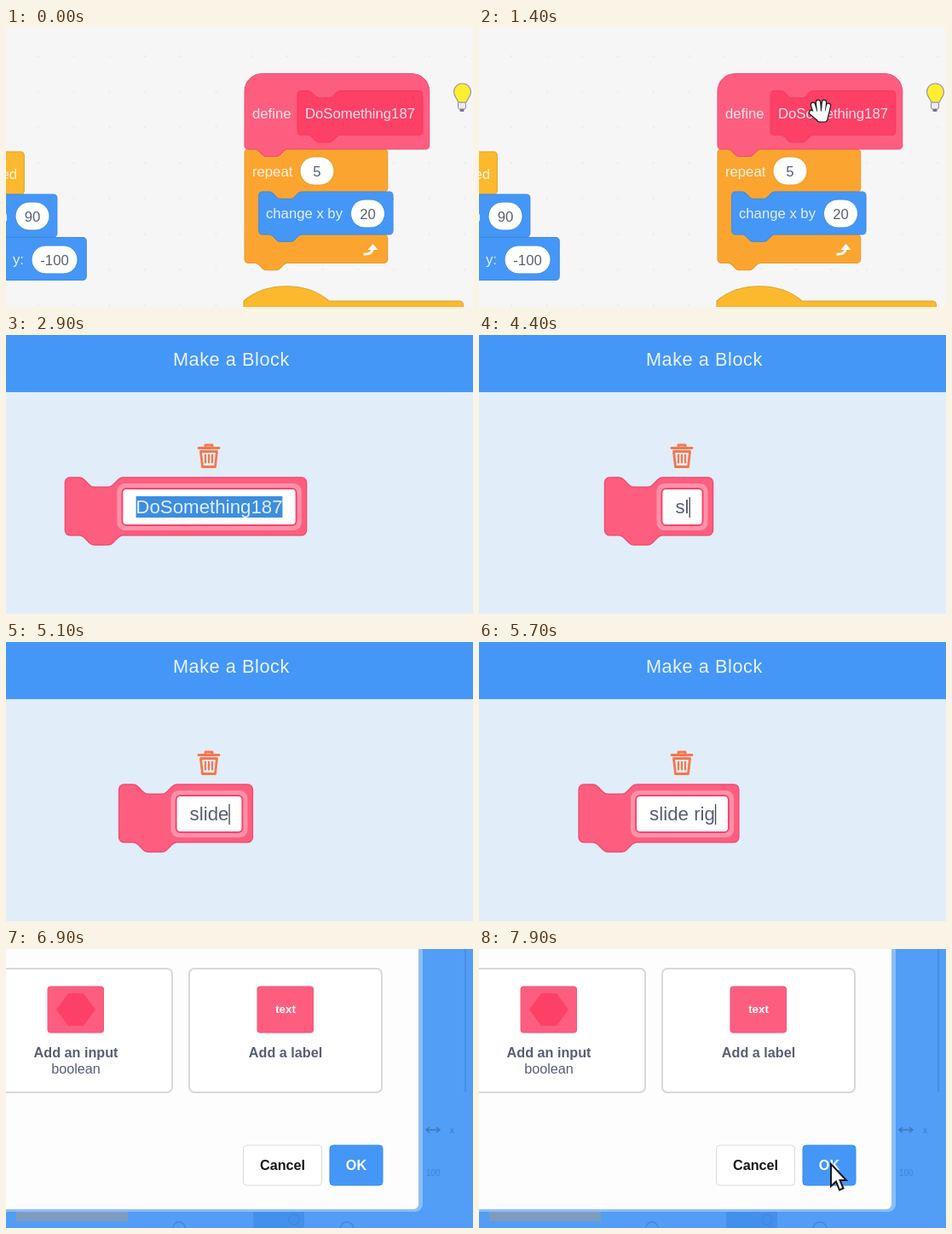
An HTML page with a canvas for the animation above (8000 ms loop, 548 by 327 pixels).

```html
<!DOCTYPE html>
<html lang="en">
<head>
<meta charset="utf-8">
<title>Renaming a custom block</title>
<style>
  html, body { margin: 0; width: 100%; height: 100%; overflow: hidden; background: #f6f6f7; }
  canvas { display: block; }
</style>
</head>
<body>
<canvas id="stage" width="548" height="327"></canvas>
<script>
const ctx = document.getElementById('stage').getContext('2d');
const LOOP = 8000, SCALE = 1.042;
const FONT = '"Liberation Sans", Arial, sans-serif';
const PINK = '#fd5e7f', PINK_DARK = '#fd4066', PINK_LINE = '#f04c72';
const BLUE = '#4597f7', BLUE_LINE = '#4089e0';
const ORANGE = '#fba530', ORANGE_LINE = '#e69a2c';
const YELLOW = '#fcb92e', YELLOW_LINE = '#dba62a';
const INK = '#575e75';

// Times of the cuts and key presses
const MENU_OPENS = 1750, DIALOG_OPENS = 2400, DIALOG_BOTTOM = 6900;
const NEW_NAME = 'slide right';
const KEY_TIMES = [4200, 4400, 4600, 4800, 5000, 5200, 5350, 5500, 5650, 5800, 5900];

// Block outlines, in block units
const NOTCH = 'c2 0 3 1 4 2l4 4c1 1 2 2 4 2h12c2 0 3-1 4-2l4-4c1-1 2-2 4-2';
const TAB = 'c-2 0-3 1-4 2l-4 4c-1 1-2 2-4 2h-12c-2 0-3-1-4-2l-4-4c-1-1-2-2-4-2';
const corner = (dx, dy, r = 4) => `a${r} ${r} 0 0 1 ${dx * r} ${dy * r}`;
const rightAndBottom = (w, h) => `V${h - 4}${corner(-1, 1)}H48${TAB}H4${corner(-1, -1)}z`;
const stackPath = (w, h = 48) =>
  `M0 4${corner(1, -1)}h8${NOTCH}H${w - 4}${corner(1, 1)}` + rightAndBottom(w, h);
const definePath = (w, h) =>
  `M0 20${corner(1, -1, 20)}H${w - 20}${corner(1, 1, 20)}` + rightAndBottom(w, h);
const hatPath = w => `M0 0c25-22 71-22 96 0H${w - 4}${corner(1, 1)}` + rightAndBottom(w, 48);
const loopPath = w =>
  `M0 4${corner(1, -1)}h8${NOTCH}H${w - 4}${corner(1, 1)}v40${corner(-1, 1)}H64${TAB}h-8` +
  `a4 4 0 0 0-4 4v40a4 4 0 0 0 4 4h8${NOTCH}H${w - 4}${corner(1, 1)}` + rightAndBottom(w, 128);

const ARROW = 'M0 0V26L6 20.5L10 30.5L14.5 28.5L10.5 19H18Z';

const clamp = v => Math.max(0, Math.min(1, v));
const ease = v => v * v * (3 - 2 * v);
const mix = (a, b, v) => a + (b - a) * v;

function glide(t, start, end, from, to) {
  const v = ease(clamp((t - start) / (end - start)));
  return [mix(from[0], to[0], v), mix(from[1], to[1], v)];
}

function rect(x, y, w, h, fill, r = 0, line, lineWidth = 1) {
  ctx.beginPath();
  ctx.roundRect(x, y, w, h, r);
  paint(fill, line, lineWidth);
}

function circle(x, y, r, fill, line, lineWidth) {
  ctx.beginPath();
  ctx.arc(x, y, r, 0, Math.PI * 2);
  paint(fill, line, lineWidth);
}

function paint(fill, line, lineWidth = 1, path) {
  const shape = path ? [path] : [];
  if (fill) { ctx.fillStyle = fill; ctx.fill(...shape); }
  if (line) { ctx.strokeStyle = line; ctx.lineWidth = lineWidth; ctx.stroke(...shape); }
}

function draw(path, x, y, fill, line, lineWidth = 1, scale = 1) {
  ctx.save();
  ctx.translate(x, y);
  ctx.scale(scale, scale);
  paint(fill, line, lineWidth, new Path2D(path));
  ctx.restore();
}

const block = (path, x, y, fill, line) => draw(path, x, y, fill, line, 1, SCALE);

function text(string, x, y, size, color, align = 'left', weight = 400) {
  ctx.font = `${weight} ${size}px ${FONT}`;
  ctx.textAlign = align;
  ctx.fillStyle = color;
  ctx.fillText(string, x, y);
}

const label = (string, x, y, align) => text(string, x, y, 16.7, 'rgba(255,255,255,.85)', align);

function pill(value, x, y, w, line) {
  rect(x - w / 2, y - 16.5, w, 33, '#fff', 16.5, line);
  text(value, x, y + 6, 16.7, INK, 'center');
}

function arrow(x, y) {
  draw(ARROW, x, y, '#fff', '#161616', 2);
}

function hand(x, y) {
  const fingers = 'M-6 3L-9-7M-2 0L-3-10M3 0L4-10M7 3L9-6M-4 8L-11 2';
  const palm = 'M-3 4H5L4 9H-1Z';
  ctx.save();
  ctx.lineCap = ctx.lineJoin = 'round';
  for (const [color, grow] of [['#222', 2.6], ['#fff', 0]]) {
    draw(fingers, x, y, null, color, 4 + grow);
    draw(palm, x, y, color, color, 7 + grow);
  }
  ctx.restore();
}

function bulb() {
  rect(530.5, 87, 9, 8, '#eeecf2', 2, '#8d87a8');
  rect(532.5, 95, 5, 3, '#77718c', 1);
  draw('M-5 11C-5 7-10 5-10-1A10 10 0 0 1 10-1C10 5 5 7 5 11Z', 535.5, 76, '#fdee32', '#a094a8', 1.2);
}

function workspace() {
  rect(0, 0, 548, 327, '#f6f6f7');
  for (let x = -4.7; x < 548; x += 41.7)
    for (let y = 32; y < 327; y += 41.7) rect(x, y, 2, 2, '#ebebee');

  block(stackPath(174), -160, 145, YELLOW, YELLOW_LINE);
  block(stackPath(211), -160, 195, BLUE, BLUE_LINE);
  block(stackPath(244), -160, 245.5, BLUE, BLUE_LINE);
  label('clicked', 13, 176.5, 'right');
  label('in direction', 2, 226, 'right');
  label('y:', 8, 277);
  pill('90', 31, 220.5, 40, BLUE_LINE);
  pill('-100', 57, 271.5, 54, BLUE_LINE);

  block(hatPath(247), 279, 320, YELLOW, YELLOW_LINE);
  block(loopPath(161), 280, 142, ORANGE, ORANGE_LINE);
  block(definePath(208, 85), 280, 53.5, PINK, PINK_LINE);
  block(stackPath(141, 50), 342, 73.5, PINK_DARK, '#f93a62');
  block(stackPath(151), 296.7, 192, BLUE, BLUE_LINE);
  label('define', 289, 105.5);
  label('DoSomething187', 351, 105.5);
  label('repeat', 289, 173.5);
  label('change x by', 305, 223);
  pill('5', 365, 167.5, 40, ORANGE_LINE);
  pill('20', 424.5, 217.5, 40, BLUE_LINE);
  draw('M0 12Q10 13 11 5', 419.5, 253, null, '#fff', 2.8);
  draw('M5 6H17L11-1Z', 419.5, 254, '#fff');
  bulb();
}

function menu(pointerY) {
  ctx.save();
  ctx.shadowColor = 'rgba(0,0,0,.3)';
  ctx.shadowBlur = 5;
  rect(394, 87, 180, 121, '#fcfcfc', 3, '#83838a');
  ctx.restore();
  const row = Math.floor((pointerY - 94) / 37);
  if (row >= 0) rect(394.5, 94 + row * 37, 160, 36.5, '#d5e8f2');
  ['Add Comment', 'Delete Block', 'Edit'].forEach((item, i) =>
    text(item, 438, 119 + i * 37.3, 21.5, '#222'));
}

function workspaceScene(t) {
  workspace();
  if (t < MENU_OPENS) {
    if (t > 450) hand(...glide(t, 450, 1100, [470, 350], [401, 97]));
    return;
  }
  const tip = t < 2150
    ? glide(t, MENU_OPENS, 2080, [396, 88], [430, 152])
    : glide(t, 2150, 2300, [430, 152], [434, 182]);
  menu(tip[1]);
  arrow(...tip);
}

function trashCan(x, y) {
  ctx.save();
  ctx.lineCap = ctx.lineJoin = 'round';
  const color = '#f6774c';
  draw('M-12 5H12M-4 4V1.5H4V4M-9.5 9L-7.5 27H7.5L9.5 9Z', x, y, null, color, 2.8);
  draw('M-4 13V22M0 13V22M4 13V22', x, y, null, color, 2.2);
  ctx.restore();
}

function nameScene(t) {
  rect(0, 0, 548, 327, '#e1edf8');
  rect(0, 0, 548, 67, BLUE);
  ctx.letterSpacing = '.55px';
  text('Make a Block', 196, 36, 21.7, '#eaf3fe');
  ctx.letterSpacing = '0px';
  trashCan(238, 127.5);

  const typed = KEY_TIMES.filter(k => k <= t).length;
  const name = typed ? NEW_NAME.slice(0, typed) : 'DoSomething187';
  ctx.font = `22.3px ${FONT}`;
  const nameWidth = ctx.measureText(name).width;
  const fieldWidth = nameWidth + 32, fieldX = 238.5 - fieldWidth / 2, nameX = fieldX + 16;

  const scale = 1.41;
  draw(stackPath((fieldWidth + 79) / scale), fieldX - 67, 167, PINK, PINK_LINE, 1, scale);
  rect(fieldX - 6, 174, fieldWidth + 12, 55, '#ff91a8', 9);
  rect(fieldX, 180, fieldWidth, 43, '#fff', 5, '#f9446a', 2);
  text(name, nameX, 209, 22.3, INK);

  if (!typed) {
    const selected = nameWidth * clamp((t - 2450) / 430);
    ctx.save();
    ctx.beginPath();
    ctx.rect(nameX, 189, selected, 25);
    ctx.clip();
    rect(nameX, 189, selected, 25, '#3c8edf');
    text(name, nameX, 209, 22.3, '#e3eefa');
    ctx.restore();
  } else if ((t - KEY_TIMES[typed - 1]) % 1000 < 200) {
    rect(nameX + nameWidth, 190, 1.3, 24, '#444');
  }
}

function confirmScene(t) {
  rect(0, 0, 548, 327, '#529df6');
  // Dimmed editor behind the dialog
  rect(12, 306, 131, 13, '#7e9bbd');
  rect(290, 306, 60, 21, '#4290ee', 3);
  for (const [x, y, r] of [[203, 327, 7], [338, 317, 6], [400, 328, 8]])
    circle(x, y, r, null, '#4387d8', 1.3);
  rect(538.5, 0, 1, 168, '#3f82d2');
  draw('M0 0H16M4-3L0 0L4 3M12-3L16 0L12 3', 493, 212, null, '#3f78bd', 1.5);
  text('x', 521, 216, 10, '#3f78bd');
  text('100', 493, 266, 10, '#3f86da');

  rect(-20, -20, 509, 328, '#8dbef9', 9);
  rect(-20, -20, 504, 325, '#fdfdfd', 6);
  rect(-31, 23, 226, 145, '#fff', 6, '#d5d8dc', 2);
  rect(215, 23, 226, 145, '#fff', 6, '#d5d8dc', 2);

  rect(49, 44, 65.5, 54, PINK, 3, '#f4557a');
  draw('M-23 0L-9-19H9L23 0L9 19H-9Z', 82, 71, PINK_DARK);
  text('Add an input', 82, 127, 16.2, INK, 'center', 700);
  text('boolean', 82, 146, 16.2, INK, 'center');
  rect(295, 44, 65.5, 54, PINK, 3, '#f4557a');
  text('text', 328, 75, 13.3, '#fff', 'center', 700);
  text('Add a label', 328, 127, 16.2, INK, 'center', 700);

  rect(278.5, 230, 92, 47, '#fff', 4, '#dadada');
  text('Cancel', 324.5, 259, 16.2, '#161616', 'center', 700);
  rect(380, 230, 62, 47, BLUE, 4, '#3c8bea');
  text('OK', 411, 259, 16.2, '#fff', 'center', 700);
  arrow(...glide(t, 7250, 7800, [460, 335], [413, 252]));
}

function frame() {
  const t = performance.now() % LOOP;
  if (t < DIALOG_OPENS) workspaceScene(t);
  else if (t < DIALOG_BOTTOM) nameScene(t);
  else confirmScene(t);
  requestAnimationFrame(frame);
}
frame();
</script>
</body>
</html>
```
